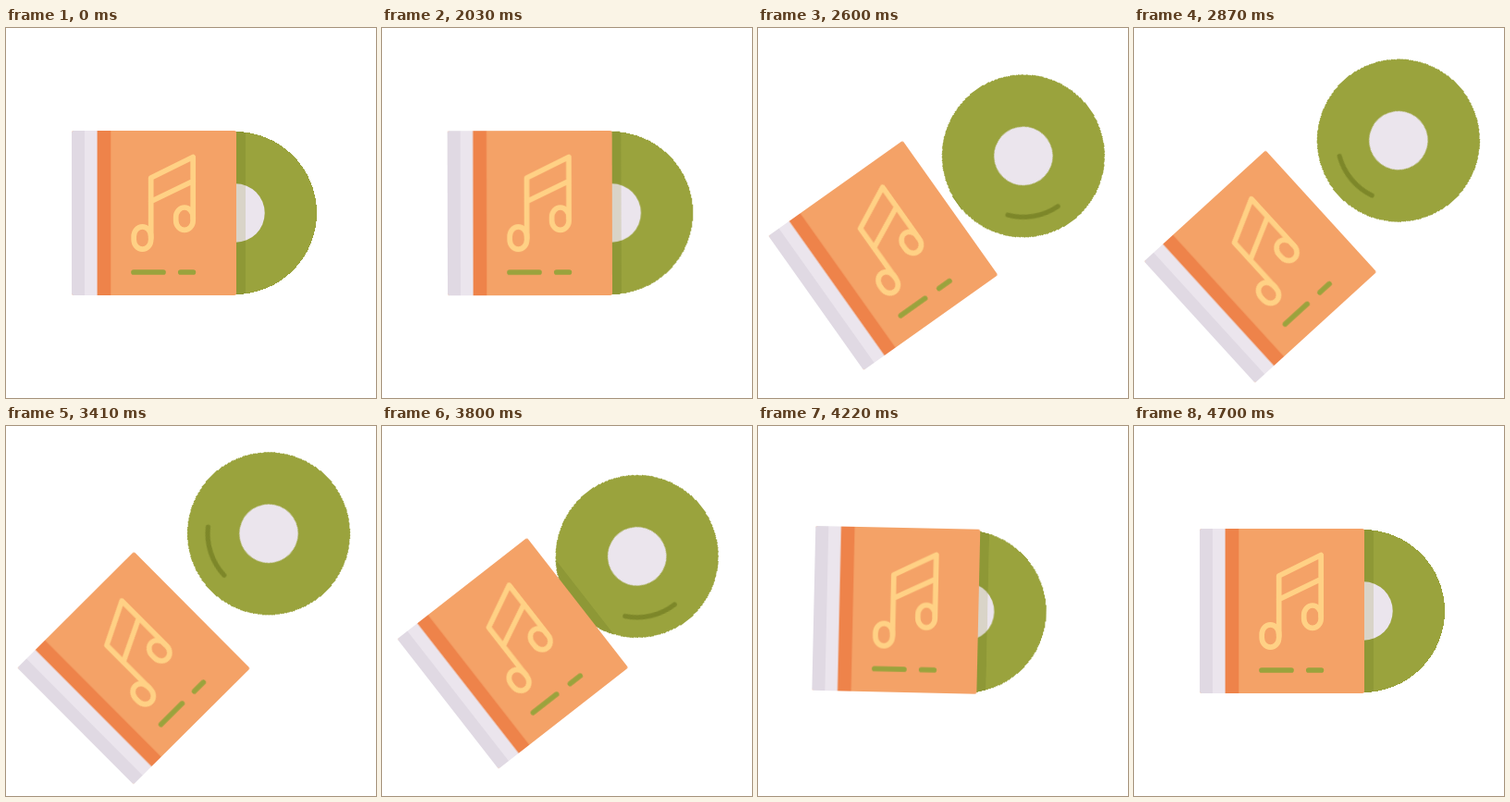
These frames come from a looping animation (400x400 px, 4730 ms). An HTML page:

```html
<!DOCTYPE html>
<html lang="en">
<head>
<meta charset="utf-8">
<title>Record sleeve</title>
<style>
  html, body { margin: 0; width: 100%; height: 100%; overflow: hidden; background: #fff; }
  svg { display: block; width: 100vw; height: 100vh; }

  .tilt, .disc, .sleeve, .back, .spin { animation: 4730ms linear infinite; }
  .tilt { animation-name: tilt; }
  .disc { animation-name: disc; }
  .sleeve, .back { animation-name: sleeve; }
  .spin { animation-name: spin; }
  .sleeve { --dir: 1px; }
  .back { --dir: -1px; }

  @keyframes tilt {
    0% { transform: rotate(0deg); }
    42.28% { transform: rotate(0deg); animation-timing-function: cubic-bezier(.285, 0, .19, 1); }
    68.65% { transform: rotate(-45deg); }
    70.61% { transform: rotate(-45deg); animation-timing-function: cubic-bezier(.885, 0, .69, 1); }
    91.23% { transform: rotate(3.4deg); animation-timing-function: cubic-bezier(.33, 0, .3, 1); }
    99.37%, 100% { transform: rotate(0deg); }
  }
  @keyframes disc {
    0% { transform: translateX(48px); }
    42.28% { transform: translateX(48px); animation-timing-function: cubic-bezier(.27, 0, .19, 1); }
    66.81% { transform: translateX(119px); }
    70.61% { transform: translateX(119px); animation-timing-function: cubic-bezier(.685, 0, .69, 1); }
    91.23% { transform: translateX(20px); animation-timing-function: cubic-bezier(.33, 0, .3, 1); }
    99.37%, 100% { transform: translateX(48px); }
  }
  @keyframes sleeve {
    0% { transform: translateX(calc(var(--dir) * -40)); }
    42.28% { transform: translateX(calc(var(--dir) * -40)); animation-timing-function: cubic-bezier(.27, 0, .19, 1); }
    66.81% { transform: translateX(calc(var(--dir) * -87.7)); }
    70.61% { transform: translateX(calc(var(--dir) * -87.7)); animation-timing-function: cubic-bezier(.56, 0, .78, 1); }
    88.79% { transform: translateX(calc(var(--dir) * -50.7)); }
    91.23% { transform: translateX(calc(var(--dir) * -50.7)); animation-timing-function: cubic-bezier(.33, 0, .3, 1); }
    99.37%, 100% { transform: translateX(calc(var(--dir) * -40)); }
  }
  @keyframes spin {
    0% { transform: rotate(131deg); }
    42.28% { transform: rotate(131deg); animation-timing-function: cubic-bezier(.27, 0, .19, 1); }
    68.65% { transform: rotate(568deg); }
    70.61% { transform: rotate(568deg); animation-timing-function: cubic-bezier(.72, 0, .69, 1); }
    91.23%, 100% { transform: rotate(131deg); }
  }
</style>
</head>
<body>
<svg viewBox="0 0 400 400">
  <defs>
    <clipPath id="edge"><rect x="86" y="-89" width="12.7" height="178"/></clipPath>
    <clipPath id="cover"><path d="M-86-89H87q2 0 2 2V87q0 2-2 2H-86q-3 0-3-3V-86q0-3 3-3z"/></clipPath>
  </defs>
  <g transform="translate(200 200)">
    <g class="tilt">
      <g class="disc">
        <circle r="88" fill="#9aa33d" shape-rendering="crispEdges"/>
        <circle r="31.7" fill="#ebe5ed"/>
        <g class="spin">
          <path d="M60-27.5A66 66 0 0 1 60 27.5" fill="none" stroke="#7d8729" stroke-width="5.2" stroke-linecap="round"/>
        </g>
      </g>

      <g class="sleeve">
        <!-- shaded disc, seen only beside the sleeve -->
        <g clip-path="url(#edge)">
          <g class="back">
            <g class="disc">
              <circle r="88" fill="#8e9836" shape-rendering="crispEdges"/>
              <circle r="31.7" fill="#d9d4c8"/>
            </g>
          </g>
        </g>

        <g clip-path="url(#cover)">
          <rect x="-89" y="-89" width="178" height="178" fill="#f4a267"/>
          <rect x="-89" y="-89" width="42.3" height="178" fill="#ee834a"/>
          <rect x="-89" y="-89" width="27.6" height="178" fill="#ebe5ed"/>
          <rect x="-89" y="-89" width="14" height="178" fill="#e0d9e3"/>
        </g>

        <g transform="translate(-160 -200)" fill="none" stroke-width="5.7" stroke-linecap="round" stroke-linejoin="round">
          <g stroke="#ffd185">
            <path d="M156.7 227V162L202.2 139.5V206M156.7 187.5L202.2 165.5"/>
            <rect x="138.2" y="214.8" width="18.5" height="24.4" rx="9.25" ry="10.5"/>
            <rect x="183.7" y="194" width="18.5" height="24.4" rx="9.25" ry="10.5"/>
          </g>
          <path d="M138 264H170M188.8 264H202.4" stroke="#9aa33d"/>
        </g>
      </g>
    </g>
  </g>
</svg>
</body>
</html>
```
